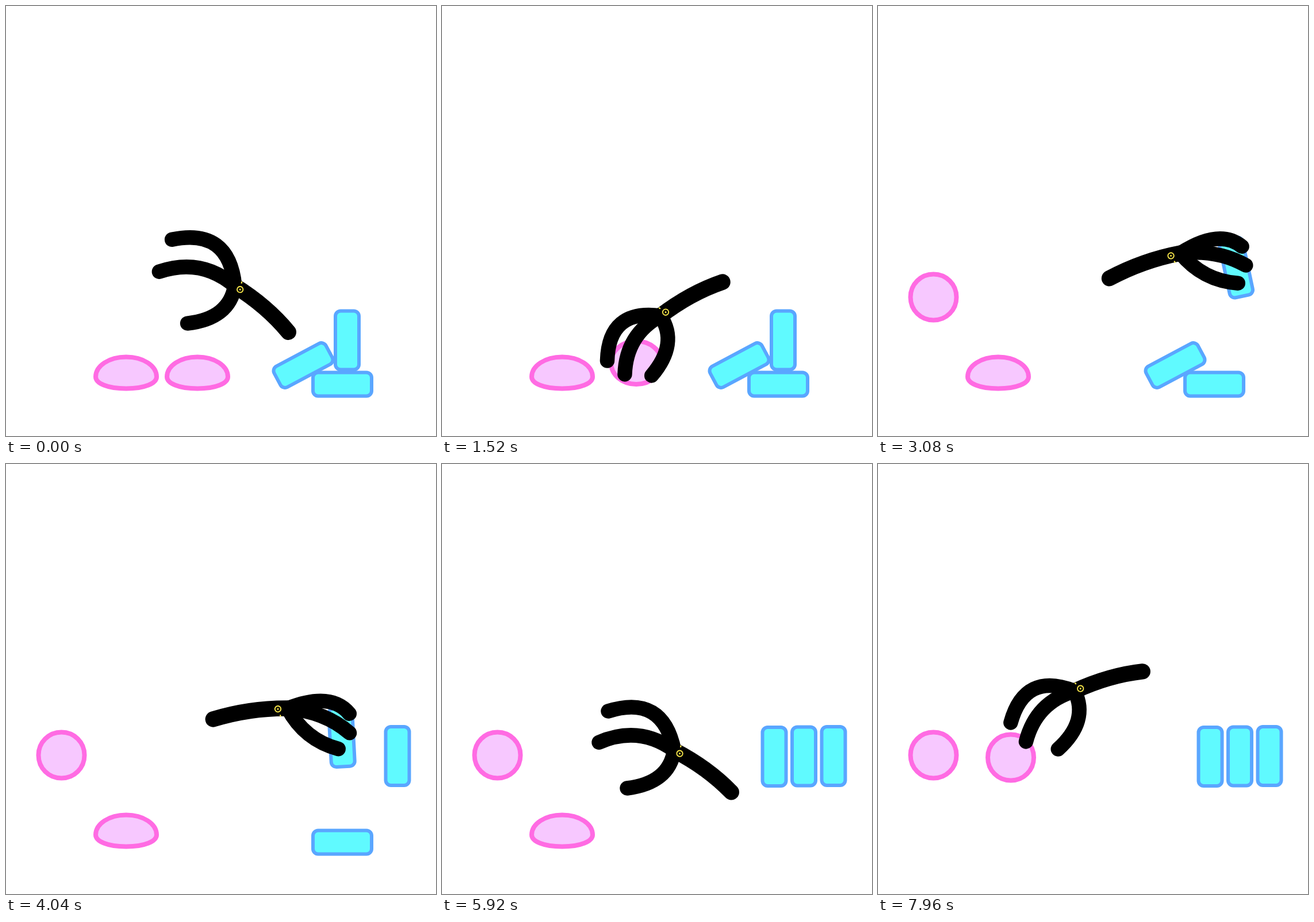
An HTML page with a canvas for the animation above (8 s loop, 748x748 px).

```html
<!DOCTYPE html>
<html lang="en">
<head>
<meta charset="utf-8">
<title>Sorting squid</title>
<style>
html, body { margin: 0; width: 100%; height: 100%; overflow: hidden; background: #fff; }
canvas { display: block; width: 100vmin; height: 100vmin; }
</style>
</head>
<body>
<canvas id="stage" width="748" height="748"></canvas>
<script>
const ctx = document.getElementById('stage').getContext('2d');
const LOOP = 8000, STEP = 40, RAD = Math.PI / 180;

// Each errand: when it is grabbed, held up and dropped, and where.
const blobs = [
  { grab: 1520, hold: 1720, drop: 2080, from: [332, 638], to: [96.5, 506.5] },
  { grab: 6480, hold: 6720, drop: 7450, from: [208, 638], to: [231, 510.5] }
];
const blocks = [
  { grab: 2780, hold: 3080, drop: 3300, from: [593.5, 581.5, 90],
    mid: [623, 455, 78], to: [681, 508, 90], joint: [526, 430, 340.5] },
  { grab: 3700, hold: 4040, drop: 4300, from: [517, 625, -28],
    mid: [584, 475.5, -93], to: [629.5, 508.5, -90], joint: [490, 425, 351.7] },
  { grab: 4800, hold: 5160, drop: 5400, from: [585, 658, 0],
    mid: [547, 453, 74], to: [578, 509, 90], joint: [450, 397, 349.5] }
];

// Squid key: time, joint x, y, heading, arm spread, side (-1 facing left, 1 right).
const blobMoves = ({ grab, hold, drop, from: [x, y], to: [u, v] }) => [
  [grab - 220, x + 52, y - 138, 160, 30, -1],
  [grab, x + 48, y - 99, 151.4, 23, -1],
  [hold, x + 54, y - 167, 151.6, 15, -1],
  [drop, u + 57, v - 78, 162, 17, -1]
];
const blockMoves = ({ grab, hold, drop, from: [x, y], to: [u, v], joint }) => [
  [grab, x - 95, y - 48, 358, 17, 1],
  [hold, ...joint, 17, 1],
  [drop, u - 95, v - 48, joint[2], 17, 1],
  [drop + 120, u - 120, v - 65, joint[2] - 8, 26, 1]
];

const squid = [
  [0, 398, 487, 220.7, 49, -1],
  [850, 400, 474, 214, 45, -1],
  [2220, 165, 420, 220, 45, -1],
  [2380, 235, 438, 275, 35, 0],
  [5700, 450, 445, 265, 40, 0],
  [5900, 410, 498, 220, 45, -1],
  [7600, 300, 425, 164, 28, -1],
  [7960, 342, 395, 163.9, 28, -1],
  ...blobs.flatMap(blobMoves),
  ...blocks.flatMap(blockMoves)
].sort((a, b) => a[0] - b[0]);

// Blob key: time, centre x, y, half width, half height, sag, lean.
const blobTracks = blobs.map(({ grab, hold, drop, from: [x, y], to }) => [
  [grab - 140, x + 1, y, 53, 27.5, 7, 0],
  [grab, x + 6, y - 17.5, 44, 37.5, 0, 0],
  [hold, x + 7, y - 34.5, 37.5, 58.5, 22, -14],
  [drop, ...to, 40, 40, 0, 0]
]);
const blockTracks = blocks.map(b =>
  [[b.grab, ...b.from], [b.hold, ...b.mid], [b.drop, ...b.to]]);

// Smooth interpolation that never overshoots a key.
function sample(track, t) {
  const last = track.length - 1;
  if (t <= track[0][0]) return track[0].slice(1);
  if (t >= track[last][0]) return track[last].slice(1);
  const i = track.findIndex(k => k[0] > t) - 1;
  const a = track[i], b = track[i + 1];
  const span = b[0] - a[0], u = (t - a[0]) / span;
  const slope = (j, c) => (track[j + 1][c] - track[j][c]) / (track[j + 1][0] - track[j][0]);
  const tangent = (j, c) => {
    if (j === 0 || j === last) return 0;
    const p = slope(j - 1, c), q = slope(j, c);
    return p * q <= 0 ? 0 : 2 * p * q / (p + q);
  };
  const ease = u * u * (3 - 2 * u);
  return a.slice(1).map((v, n) => {
    const c = n + 1;
    return v + (b[c] - v) * ease +
      span * u * (1 - u) * ((1 - u) * tangent(i, c) - u * tangent(i + 1, c));
  });
}

function paint(fill, stroke, width) {
  ctx.fillStyle = fill;
  ctx.strokeStyle = stroke;
  ctx.lineWidth = width;
  ctx.fill();
  ctx.stroke();
}

// An oval whose widest line sags and whose top leans, pinching the right flank.
function drawBlob([x, y, w, h, sag, lean]) {
  const k = 0.56, up = (h + sag) * k, down = (h - sag) * k;
  const top = w * k, base = w * k + sag * 0.4;
  ctx.save();
  ctx.translate(x, y);
  ctx.beginPath();
  ctx.moveTo(-w, sag);
  ctx.bezierCurveTo(-w, sag - up, lean - top, -h, lean, -h);
  ctx.bezierCurveTo(lean + top, -h, w, sag - up * (1 + lean / 20), w, sag);
  ctx.bezierCurveTo(w, sag + down, base, h, 0, h);
  ctx.bezierCurveTo(-base, h, -w, sag + down, -w, sag);
  ctx.closePath();
  paint('#f7c8ff', '#ff6be3', 8);
  ctx.restore();
}

function drawBlock([x, y, angle]) {
  ctx.save();
  ctx.translate(x, y);
  ctx.rotate(angle * RAD);
  ctx.beginPath();
  ctx.roundRect(-51, -20.5, 102, 41, 9);
  paint('#60faff', '#5aa6ff', 6);
  ctx.restore();
}

const polar = (r, deg) => [r * Math.cos(deg * RAD), r * Math.sin(deg * RAD)];

function limb(bend, tip, width) {
  ctx.lineWidth = width;
  ctx.beginPath();
  ctx.moveTo(0, 0);
  ctx.quadraticCurveTo(...bend, ...tip);
  ctx.stroke();
}

function arm(length, tip, bow, pull) {
  limb(polar(length * pull, tip + bow), polar(length, tip), 25.5);
}

function drawEye(browAngle) {
  ctx.strokeStyle = ctx.fillStyle = '#f7e64a';
  ctx.lineWidth = 1.9;
  ctx.beginPath();
  ctx.arc(0, 0, 5.2, 0, 7);
  ctx.stroke();
  ctx.beginPath();
  ctx.arc(0, 0, 1.5, 0, 7);
  ctx.fill();
  ctx.rotate(browAngle * RAD);
  ctx.lineCap = 'butt';
  ctx.lineWidth = 2.2;
  ctx.beginPath();
  ctx.moveTo(10.8, 0);
  ctx.lineTo(14.3, 0);
  ctx.stroke();
}

function drawSquid([x, y, heading, spread, side]) {
  const curl = side * 0.775 - 0.225;
  const length = 106 + spread * 0.57;
  ctx.save();
  ctx.translate(x, y);
  ctx.rotate(heading * RAD);
  ctx.lineCap = 'round';
  ctx.strokeStyle = '#000';
  limb([-65, -10 * side], [-127 - 4 * side, 0], 27.5);
  arm(length - 3 - 5 * side, side * (18 - spread * 0.28), -48 * curl, 0.75);
  arm(length, side * 30, -30 * curl, 0.57);
  arm(109 + 4 * side, side * (30 + spread), 42 * curl, 0.55);
  ctx.translate(-14 - 3 * side, -1.3 * side);
  drawEye(70 + 8 * side);
  ctx.restore();
}

const start = performance.now();
function frame(now) {
  const t = Math.floor((Math.max(0, now - start) % LOOP) / STEP) * STEP;
  ctx.fillStyle = '#fff';
  ctx.fillRect(0, 0, 748, 748);
  blobTracks.forEach(b => drawBlob(sample(b, t)));
  blockTracks.forEach(b => drawBlock(sample(b, t)));
  drawSquid(sample(squid, t));
  requestAnimationFrame(frame);
}
frame(start);
</script>
</body>
</html>
```
